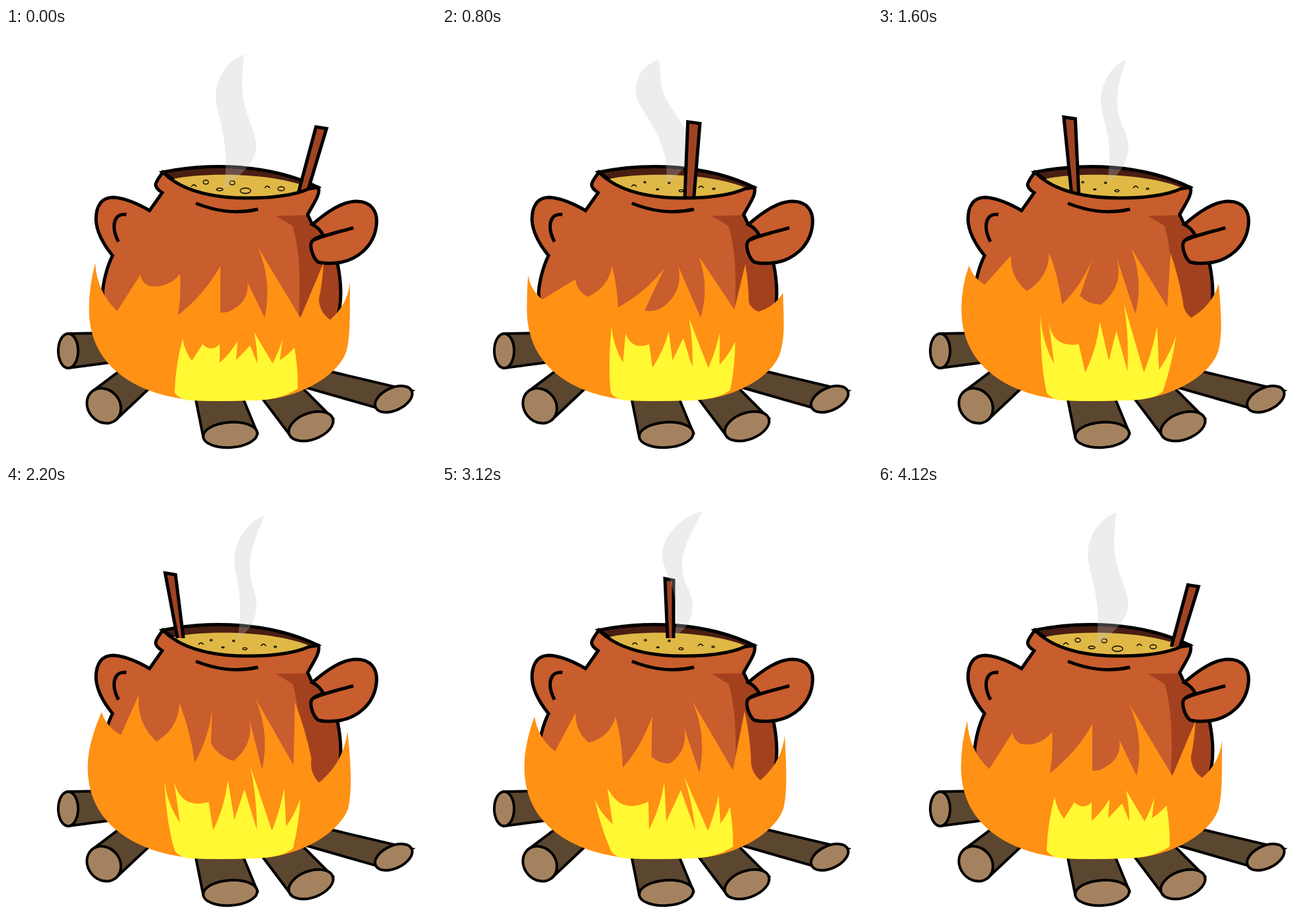
An HTML page for the animation above (4.16 s loop, 650 by 650 pixels).

```html
<!DOCTYPE html>
<html lang="en">
<head>
<meta charset="utf-8">
<title>Pot on the fire</title>
<style>
  html, body { margin: 0; width: 100%; height: 100%; overflow: hidden; background: #fff; }
  svg { display: block; width: 100vw; height: 100vh; }
  .ink { fill: none; stroke: #000; stroke-width: 5; }
  .log { fill: #5b4630; stroke: #000; stroke-width: 4; }
  .end { fill: #a5825f; stroke: #000; stroke-width: 4; }
  .stick { fill: #9f4323; stroke: #000; stroke-width: 5; }
</style>
</head>
<body>
<svg viewBox="0 0 650 650">
  <defs>
    <path id="body" d="M237 218C263 244 305 257 365 257C410 257 440 251 458 243L472 241C476 250 466 264 456 282L463 297
      Q474 302 480 313L501 355C508 390 507 420 500 440C480 560 160 560 150 440L146 400C147 385 152 362 161 344
      C148 328 137 310 136 290C136 268 145 256 162 256C180 257 200 266 217 276L236 249C220 238 226 234 237 218Z"/>
  </defs>
  <g id="logs"></g>
  <path d="M237 218C310 203 400 206 472 241L440 262L300 262Z" fill="#4a1e12" stroke="#000" stroke-width="5"/>
  <path d="M249 229C300 217 410 219 462 243L440 262L300 262Z" fill="#e0b846"/>
  <path id="bubbles" fill="none" stroke="#000" stroke-width="1.3"/>
  <path id="stickBehind" class="stick"/>
  <path id="steam" fill="#c3c3c3" opacity=".3"/>
  <path id="stickBefore" class="stick"/>
  <use href="#body" fill="#c85d2d"/>
  <path d="M408 284L456 283L463 297Q474 302 480 313L501 356C507 390 505 420 498 470L440 470C446 400 446 340 433 299Z" fill="#a3411f"/>
  <use href="#body" class="ink"/>
  <path d="M463 297C485 278 508 262 530 262C552 262 562 277 560 297C557 330 530 352 500 355Q484 357 472 354
    C463 347 457 326 464 321Q470 316 480 314Q474 302 463 297Z" fill="#c85d2d" stroke="#000" stroke-width="5"/>
  <path class="ink" d="M464 321C480 313 505 308 525 302M182 282C163 279 158 300 170 323M287 265C315 276 345 282 381 274"/>
  <path id="fire" fill="#ff9115"/>
  <path id="glow" fill="#fff833"/>
</svg>
<script>
const LOOP = 4160, STEP = 40, LAST = LOOP - STEP;
const el = id => document.getElementById(id);
const lerp = (a, b, u) => a + (b - a) * u;

// A log tapers from its sawn end (centre, radii, tilt) to a root under the fire.
function log(x, y, major, minor, tilt, rootX, rootY) {
  const a = tilt * Math.PI / 180, dx = major * Math.cos(a), dy = major * Math.sin(a), taper = .85;
  const d = `M${x - dx} ${y - dy}L${rootX - dx * taper} ${rootY - dy * taper}` +
    `L${rootX + dx * taper} ${rootY + dy * taper}L${x + dx} ${y + dy}Z`;
  return `<path class="log" d="${d}"/>
    <ellipse class="end" rx="${major}" ry="${minor}" transform="translate(${x} ${y}) rotate(${tilt})"/>`;
}
el('logs').innerHTML =
  log(94, 488, 26, 15, 90, 162, 483) +
  log(148, 571, 28, 24, 50, 205, 523) +
  log(339, 615, 41, 19, -4, 321, 556) +
  log(461, 602, 35, 20, -20, 414, 548) +
  log(586, 561, 30, 17, -25, 467, 530);

// Blends the poses in step with the time; the last one leads back to the first.
function tween(poses) {
  const all = { [LAST]: poses[0], ...poses };
  const times = Object.keys(all).map(Number);
  const values = times.map(t => all[t].trim().split(/\s+/).map(Number));
  return t => {
    const n = Math.max(1, times.findIndex(at => at >= t));
    const u = (t - times[n - 1]) / (times[n] - times[n - 1]);
    return values[n - 1].map((v, i) => lerp(v, values[n][i], u));
  };
}

// top, foot, half widths at top and foot
const stickAt = tween({
  0: '476.5 151 445 262 8 6.5',
  1040: '352 141 351 280 9.5 6.5',
  2080: '236 132 253 230 8 4.5',
  3120: '343.5 141.5 345.5 230 6.5 4.5',
  4120: '476.5 151 450 243 8 6.5'
});

// tip, left bulge, foot, right waist
const steamAt = tween({
  0: '360 40 317 104 329 243 357 88',
  800: '327 48 293 98 338 237 330 75',
  1840: '390 47 350 115 349 234 371 118',
  3120: '394 38 333 105 352 228 363 115'
});

// tips and hollows from left to right
const fireAt = tween({
  0: `135 355 168 428 203 373 216 390 263 372 260 434 324 360 324 430 345 424
    365 384 391 438 380 330 445 438 480 355 473 410 490 441 520 384`,
  1040: `129 380 147 405 201 382 221 411 255 356 268 419 340 364 301 426 329 422
    355 353 391 438 391 350 441 422 452 358 461 416 475 425 514 405`,
  2080: `145 341 174 373 201 311 228 386 262 325 287 417 311 335 309 387 344 415
    366 343 387 428 376 319 434 421 434 325 461 412 472 449 516 370`
});
const fireBows = [.2, 0, .25, .28, -.06, .1, 0, .2, .33, 0, .16, 0, 0, -.04, .25, .2];

const glowAt = tween({
  0: `267 470 281 503 297 478 323 478 323 506 350 473 348 502 369 480
    380 507 375 460 403 507 418 470 414 502 436 483 441 545`,
  1640: `245 431 266 508 257 444 303 478 313 521 335 443 349 503 360 457
    377 519 372 417 402 521 422 450 425 517 451 464 430 550`,
  3120: `231 474 258 511 250 456 312 477 313 519 336 447 339 507 361 460
    383 521 366 439 402 521 418 467 421 510 435 485 440 545`
});
const glowBows = [.12, 0, .5, 0, .09, 0, 0, 0, .05, 0, .05, 0, .08, -.05];

// Joins points with curves, each bowed sideways by a share of its length.
function crest(v, bows) {
  return `M${v[0]} ${v[1]}` + bows.map((bow, i) => {
    const [ax, ay, bx, by] = v.slice(2 * i, 2 * i + 4);
    return `Q${(ax + bx) / 2 - bow * (by - ay)} ${(ay + by) / 2 + bow * (bx - ax)} ${bx} ${by}`;
  }).join('');
}

function firePath(v) {
  const [x, y] = v, tipY = v[v.length - 1];
  const left = 124 + (y - 345) * .15;
  const right = 522 - (tipY - 371) * .17;
  return crest(v, fireBows) +
    `C${right} ${tipY + 50} ${right + 1} 465 ${right - 5} 488C503 525 445 558 390 562
    Q340 565 290 563C210 558 ${left} 520 ${left} 425Q${left} 390 ${x} ${y}Z`;
}

function glowPath(v) {
  const [x, y] = v;
  return crest(v, glowBows) +
    `Q415 563 370 563Q320 565 280 563Q262 562 255 551Q${(x + 255) / 2 - 5} 510 ${x} ${y}Z`;
}

function steamPath([tx, ty, lx, ly, fx, fy, wx, wy]) {
  return `M${tx} ${ty}C${lerp(tx, lx, .6)} ${lerp(ty, ly, .15)} ${lx} ${ly - 28} ${lx} ${ly}
    C${lx} ${ly + 25} ${fx + 12} ${fy - 70} ${fx} ${fy}C${fx + 20} ${fy - 16} 378 205 378.5 178
    C378 155 ${wx} ${wy + 38} ${wx} ${wy}Q${wx} ${wy - 22} ${tx} ${ty}Z`;
}

function stickPath([x, y, footX, footY, half, footHalf]) {
  return `M${footX - footHalf} ${footY}L${x - half} ${y - 1.5}L${x + half} ${y + 1}L${footX + footHalf} ${footY}`;
}

// Bubbles shrink from their full size and drift towards the middle of the soup.
const bubbles = [[302, 233, 4, 3], [323, 244, 5, 2], [342, 234, 4, 3], [362, 246, 8, 4], [416, 243, 5, 3]];
const ripples = [[284, 240], [395, 242]];

function bubblesPath(t) {
  const size = .4 + .6 * Math.max(0, Math.cos(2 * Math.PI * t / LAST)) ** 10;
  const spread = 1 - .15 * Math.sin(Math.PI * t / LAST);
  const drift = x => 356 + (x - 356) * spread;
  return bubbles.map(([x, y, w, h]) => {
    const rx = w * size, ry = h * size;
    return `M${drift(x) - rx} ${y}a${rx} ${ry} 0 1 0 ${2 * rx} 0a${rx} ${ry} 0 1 0 ${-2 * rx} 0`;
  }).join('') + ripples.map(([x, y]) => `M${drift(x) - 4} ${y}q4 -6 8 0`).join('');
}

function draw(t) {
  const set = (id, d) => el(id).setAttribute('d', d);
  const stick = stickPath(stickAt(t));
  const inFront = t < LOOP / 2;
  set('stickBefore', inFront ? stick : '');
  set('stickBehind', inFront ? '' : stick);
  set('steam', steamPath(steamAt(t)));
  set('bubbles', bubblesPath(t));
  set('fire', firePath(fireAt(t)));
  set('glow', glowPath(glowAt(t)));
}

const start = performance.now();
function tick() {
  const t = (performance.now() - start) % LOOP;
  draw(Math.floor(t / STEP) * STEP);
  requestAnimationFrame(tick);
}
tick();
</script>
</body>
</html>
```
